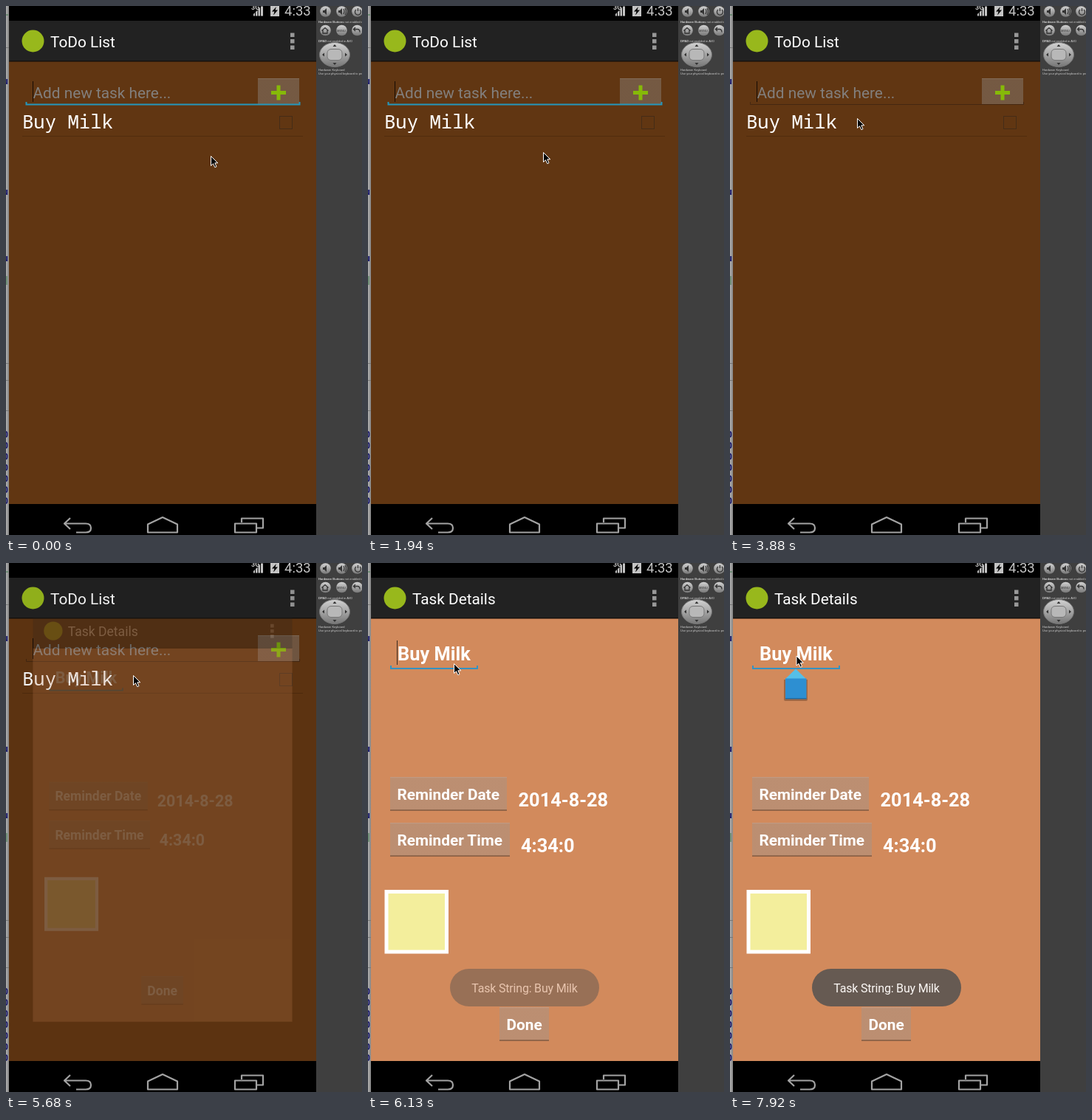
An HTML page for the animation above (8 s loop, 482 px wide and 717 px high).

```html
<!DOCTYPE html>
<html lang="en">
<head>
<meta charset="utf-8">
<title>ToDo List</title>
<style>
  html, body { margin: 0; width: 100%; height: 100%; overflow: hidden; background: #3f3f3f; }
  svg { display: block; width: 100vw; height: 100vh; font-family: Roboto, sans-serif; }
  text { white-space: pre; }
  .body { font-size: 20.8px; }
  .large { font-size: 25.4px; }
  .bold { font-weight: 700; }
  .row { font: 25.6px "Noto Sans Mono", monospace; }
  .tiny { font: 4px "Liberation Sans", Arial, sans-serif; fill: #d0d0d0; }
  .line { fill: none; stroke-width: 2; }
  .nav { fill: none; stroke: #a3a3a3; stroke-width: 2.2; stroke-linejoin: round; }
  .icon { fill: none; stroke: #333; stroke-width: 1.3; }
</style>
</head>
<body>
<svg viewBox="0 0 482 717" fill="#fff">
  <defs>
    <linearGradient id="button" x2="0" y2="1">
      <stop offset="0" stop-color="#b4b4b4" stop-opacity=".5"/>
      <stop offset=".04" stop-color="#969696" stop-opacity=".37"/>
      <stop offset=".96" stop-color="#969696" stop-opacity=".37"/>
      <stop offset=".97" stop-color="#222" stop-opacity=".45"/>
      <stop offset="1" stop-color="#222" stop-opacity=".35"/>
    </linearGradient>
    <linearGradient id="metal" x2="0" y2="1">
      <stop stop-color="#d2d2d2"/><stop offset="1" stop-color="#777"/>
    </linearGradient>
    <linearGradient id="edge">
      <stop stop-color="#b0b0b0"/><stop offset="1" stop-color="#858585"/>
    </linearGradient>
    <g id="bar">
      <path fill="#222" d="M4 20h416v55H4z"/>
      <path fill="#15110e" d="M4 74h416v1.5H4z"/>
      <circle cx="36.5" cy="47.5" r="15" fill="#98b81c"/>
      <path fill="#989898" d="M385 36.5h5.5v5.5h-5.5zm0 8.5h5.5v5.5h-5.5zm0 8.5h5.5v5.5h-5.5z"/>
    </g>
  </defs>

  <!-- Desktop sliver on the left -->
  <path fill="url(#edge)" d="M0 0h4v717H0z"/>
  <path fill="#777" d="M0 56h4v1H0zM0 484h4v1H0zM0 507h4v1H0zM0 548h4v1H0z"/>
  <path fill="#3d7a4a" d="M0 11h3v2H0zM0 366h2v12H0z" opacity=".5"/>
  <g id="sliver" fill="#17176b" font-size="13" class="bold"></g>

  <!-- Emulator controls -->
  <path fill="#3f3f3f" d="M420 0h62v717h-62z"/>
  <g id="keys" fill="url(#metal)"></g>
  <path fill="#333" d="M429 6h2l3-3v9l-3-3h-2zM450 6h2l3-3v9l-3-3h-2z"/>
  <path class="icon" d="M457 4q2 3 0 7M459 3q3 4 0 9M474 5a4 4 0 1 0 5 0M476.500 3v4"/>
  <path class="icon" d="M427.500 33.500l4.500-4 4.500 4M429 33v4h6v-4M473 29l-2.500 2.500 2.500 2.500M471 31.500h5q3 0 3 4"/>
  <text class="tiny bold" x="454" y="35" text-anchor="middle" style="fill:#333">MENU</text>
  <text class="tiny" x="423" y="23"><tspan class="bold">Hardware Buttons</tspan> not enabled in AVD</text>
  <text class="tiny" x="423" y="49"><tspan class="bold">DPAD</tspan> not enabled in AVD</text>
  <ellipse cx="445" cy="66" rx="20.500" ry="16.500" fill="url(#metal)" stroke="#777"/>
  <rect x="435" y="58.500" width="20" height="15" rx="5" fill="#b8b8b8" stroke="#777"/>
  <path fill="#333" d="M445 52l2.500 3h-5zM445 80l2.500-3h-5zM428 66l3-2.500v5zM462 66l-3-2.500v5z"/>
  <text class="tiny bold" x="423" y="88">Hardware Keyboard</text>
  <text class="tiny bold" x="423" y="92.500">Use your physical keyboard to provide input</text>

  <!-- Phone: status and navigation bars -->
  <path fill="#000" d="M4 0h416v717H4z"/>
  <g fill="#c4c4c4">
    <text x="332" y="5" font-size="9" class="bold">3G</text>
    <path d="M335 13.500v-2.500l2-2v4.500zm3 0v-5.500l2.500-2.500v8zm3.500 0v-9l2.500-2.500v11.500zm3.500 0v-13h3v13z"/>
    <path d="M358 0h12v14h-12z"/>
    <path fill="#000" d="M366 1l-6 6.500h3.500l-1.500 5 6-7h-3.500z"/>
    <text x="377" y="12.500" font-size="18.500">4:33</text>
  </g>
  <path class="nav" d="M87 694l-8 7.500 8 7.500M79 701.500h29q7 0 7 6t-7 6h-13"/>
  <path class="nav" d="M192 713.500v-11l20-9.500 20 9.500v11z"/>
  <path class="nav" d="M310 701.500h29v12h-29zM319 700v-5.500h29v13h-8"/>

  <!-- List screen -->
  <g id="list">
    <path fill="#613612" d="M4 75h416v600H4z"/>
    <use href="#bar"/>
    <text class="body" x="60" y="55.500">ToDo List</text>
    <text class="body" x="36.500" y="124.500" fill="#827f7d">Add new task here...</text>
    <rect x="341" y="98" width="56" height="36" fill="url(#button)"/>
    <path d="M359 117.500h20M369 107.500v20" fill="none" stroke="#86b908" stroke-width="5"/>
    <path id="inputLine" class="line" d="M27.500 130v3.500h370V130"/>
    <path id="listCaret" fill="#150b03" d="M36 102h1v28h-1z"/>
    <path id="press" fill="#33b5e5" opacity=".4" d="M22 139h380v37H22z"/>
    <text class="row" x="22" y="166">Buy Milk</text>
    <rect x="370.500" y="149.500" width="17" height="17" fill="none" stroke="#452c17"/>
    <path fill="#512c0e" d="M22 176h380v1H22z"/>
  </g>
  <path id="dim" fill="#000" d="M4 20h416v655H4z"/>

  <!-- Details screen -->
  <g id="details">
    <path fill="#d28a5c" d="M4 75h416v600H4z"/>
    <use href="#bar"/>
    <text class="body" x="60" y="55.500">Task Details</text>
    <text class="large bold" x="40" y="132">Buy Milk</text>
    <path class="line" stroke="#3492c2" d="M31 139v4h117v-4"/>
    <path id="startCaret" fill="#3a2a20" d="M39 105h1v33h-1z"/>
    <path id="tapCaret" fill="#3a2a20" d="M89 105h1v33h-1z"/>
    <g fill="url(#button)">
      <rect x="30" y="290" width="158" height="46"/>
      <rect x="30" y="352" width="162" height="46"/>
      <rect x="178" y="602" width="67" height="46"/>
    </g>
    <g class="body bold">
      <text x="39.500" y="320.500">Reminder Date</text>
      <text x="39.500" y="383">Reminder Time</text>
      <text x="187.500" y="633">Done</text>
    </g>
    <g class="large bold">
      <text x="203.500" y="330">2014-8-28</text>
      <text x="207" y="392">4:34:0</text>
    </g>
    <path d="M22.500 443h86.500v86.500H22.500z"/>
    <path fill="#f3ee9c" d="M27.500 448h76.500v76.500H27.500z"/>
  </g>

  <g id="toast">
    <rect x="111" y="550" width="202" height="51" rx="25.500" fill="#605852"/>
    <text x="212" y="581.500" font-size="16" letter-spacing="-.2" text-anchor="middle">Task String: Buy Milk</text>
  </g>
  <g id="handle">
    <path fill="#000" opacity=".25" d="M73 158h32v27q0 2-2 2H75q-2 0-2-2z"/>
    <path fill="#55bfe8" d="M89 143.500l14.500 14H74.500z"/>
    <path fill="#2d8fd2" d="M75 156.500h28.500v27.500H75z"/>
    <path fill="#1d6ea8" d="M75 183h28.500v1.500H75z"/>
  </g>
  <path id="pointer" fill="#000" stroke="#fff" d="M.5.5v13l3-2.800 2.300 5 2.200-1-2.200-4.900h4z"/>
</svg>
<script>
const LOOP = 8000;
const el = id => document.getElementById(id);

const make = (parent, name, attrs, text = '') => {
  const node = document.createElementNS('http://www.w3.org/2000/svg', name);
  for (const key in attrs) node.setAttribute(key, attrs[key]);
  node.textContent = text;
  parent.append(node);
};

for (const y of [106, 256, 346]) make(el('sliver'), 'text', { x: -4.5, y }, 'u');
for (let y = 585; y < 680; y += 15) make(el('sliver'), 'text', { x: -4.5, y }, '0');
for (const cy of [7.5, 33]) {
  for (const cx of [432.5, 454.5, 475.5]) make(el('keys'), 'circle', { cx, cy, r: 7.3 });
}

// Step tables: [start ms, ...values], each held until the next start.
const pointerSteps = [
  [0, 277, 203], [140, 345, 222], [290, 430, 246], [440, 451, 253], [590, 385, 238],
  [1790, 325, 222], [1940, 237, 198], [2090, 210, 184], [2240, 192, 172],
  [2390, 180, 162], [2540, 173, 156], [2690, 170, 154], [2840, 170, 153], [3440, 172, 152],
  [5980, 150, 147], [6130, 116, 136], [6280, 88, 127], [6430, 76, 126],
  [6730, 83, 126], [6870, 89.5, 125.5]
];
const windowSteps = [ // scale, opacity, dimming behind
  [0, 1, 0, 0], [5680, .844, .2, .05], [5830, .985, .93, .65], [5980, 1, 1, 1]
];
const toastSteps = [[0, 0], [6130, .5], [6280, 1], [7920, .94]];
const blinkTimes = [440, 890, 1490, 1940, 2390, 2990, 3440, 3740];

const at = (steps, t) => steps.findLast(([start]) => start <= t).slice(1);
const show = (id, on) => el(id).style.visibility = on ? 'visible' : 'hidden';

function draw() {
  const t = performance.now() % LOOP;
  const [scale, opacity, dim] = at(windowSteps, t);

  el('pointer').setAttribute('transform', `translate(${at(pointerSteps, t)})`);
  el('details').setAttribute('transform',
    `translate(212 333) scale(${scale}) translate(-212 -333)`);
  el('details').setAttribute('opacity', opacity);
  el('dim').setAttribute('opacity', dim);
  el('toast').setAttribute('opacity', at(toastSteps, t)[0]);
  el('inputLine').setAttribute('stroke', t < 3740 ? '#2598bd' : '#452711');
  el('inputLine').style.strokeWidth = t < 3740 ? 2 : 1;

  show('listCaret', blinkTimes.filter(time => time <= t).length % 2 === 0);
  show('press', t >= 3740 && t < 3880);
  show('startCaret', t >= 5830 && t < 6280);
  show('tapCaret', t >= 7620 && t < 7920);
  show('handle', t >= 7920);
  requestAnimationFrame(draw);
}
draw();
</script>
</body>
</html>
```
